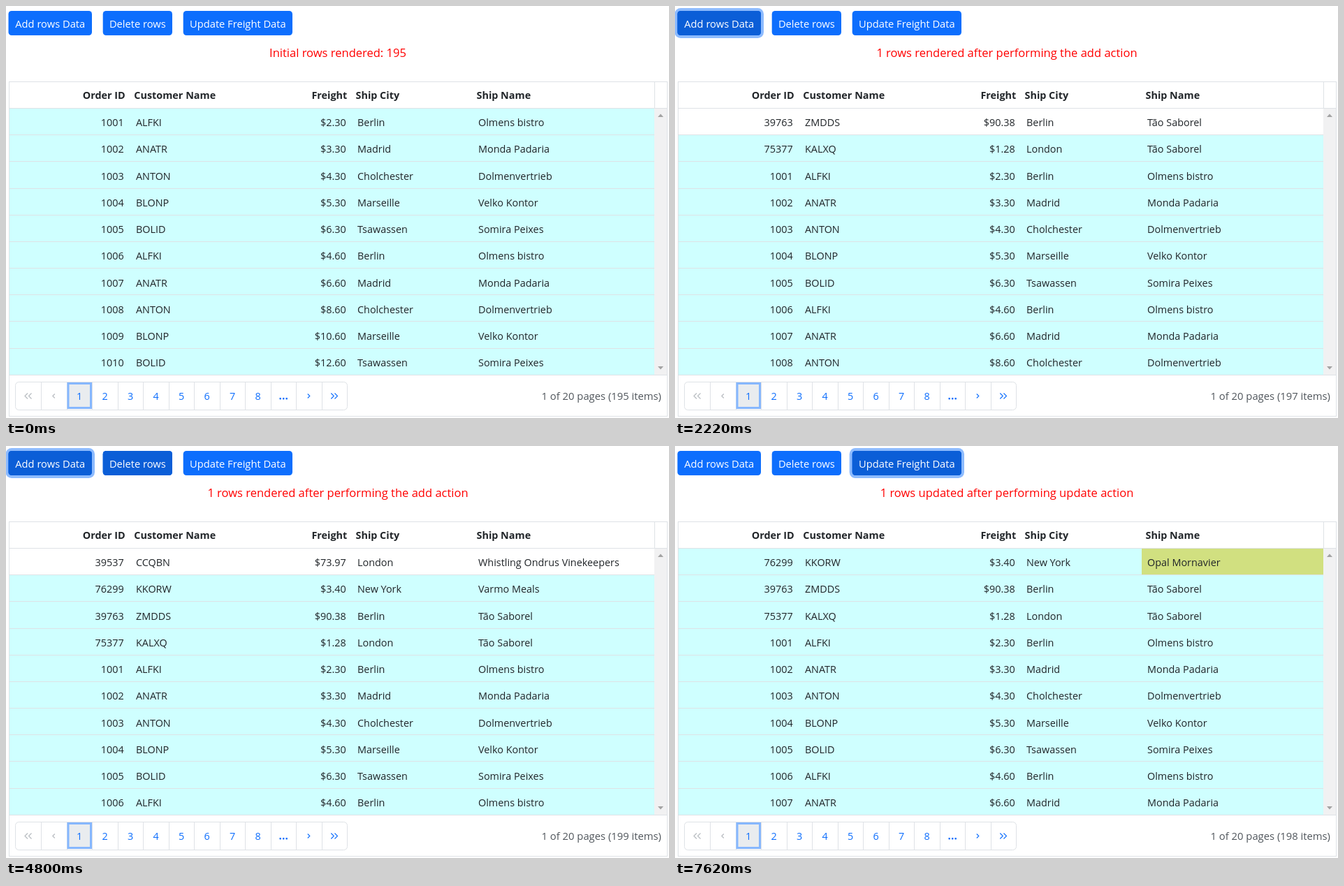
Write an HTML page that moves like this. It is 949 px wide and 590 px high and loops after 9.54 s.

```html
<!DOCTYPE html>
<html lang="en">
<head>
<meta charset="utf-8">
<title>Order grid</title>
<style>
html, body { margin: 0; width: 100%; height: 100%; overflow: hidden; background: #fff; }
svg { display: block; font: 14.4px "Open Sans", "Noto Sans", sans-serif; fill: #212529; }
.line { fill: #dee2e6; shape-rendering: crispEdges; }
.head { font-weight: 700; }
.btn { font-size: 14.7px; fill: #fff; }
.msg { font-size: 16.55px; fill: #f00; }
.info { font-size: 14.8px; fill: #50565c; }
.page { fill: #0d6efd; }
.end { text-anchor: end; }
.mid { text-anchor: middle; }
.icon { fill: none; stroke-width: 1.1; }
</style>
</head>
<body>
<svg width="949" height="590" viewBox="0 0 949 590"><g id="frame"></g><g id="live"></g></svg>
<script>
const LOOP = 9540, TICK = 60;
const ADDED = [1320, 2220, 2640, 3480], DELETED = 4980, UPDATED = 7440;

const NEW_ROWS = [
  [75377, 'KALXQ', 1.28, 'London', 'Tão Saborel'],
  [39763, 'ZMDDS', 90.38, 'Berlin', 'Tão Saborel'],
  [76299, 'KKORW', 3.4, 'New York', 'Varmo Meals'],
  [39537, 'CCQBN', 73.97, 'London', 'Whistling Ondrus Vinekeepers']
];
const CUSTOMERS = [
  ['ALFKI', 'Berlin', 'Olmens bistro'],
  ['ANATR', 'Madrid', 'Monda Padaria'],
  ['ANTON', 'Cholchester', 'Dolmenvertrieb'],
  ['BLONP', 'Marseille', 'Velko Kontor'],
  ['BOLID', 'Tsawassen', 'Somira Peixes']
];
const BASE_ROWS = Array.from({ length: 10 }, (_, i) => {
  const [code, city, ship] = CUSTOMERS[i % 5];
  return [1001 + i, code, (2.3 + i % 5) * (1 + Math.floor(i / 5)), city, ship];
});

const rect = (x, y, w, h, attrs) => `<rect x="${x}" y="${y}" width="${w}" height="${h}" ${attrs}/>`;
const line = (x, y, w, h) => rect(x, y, w, h, 'class="line"');
const text = (x, y, s, cls = '') => `<text x="${x}" y="${y}" class="${cls}">${s}</text>`;
const icon = (d, color) => `<path class="icon" d="${d}" stroke="${color}"/>`;

function chevron(x, y, dir, size, color) {
  return icon(`M${x - dir * size / 2} ${y - size}l${dir * size} ${size}l${-dir * size} ${size}`, color);
}

function drawFrame() {
  const blue = '#0d6efd', grey = '#b4b9be', cell = 36.5, mid = 558.5;
  let s = line(4, 108, 943, 1) + line(4, 587, 943, 1) + line(4, 108, 1, 480) + line(946, 108, 1, 480)
    + line(4, 146, 943, 1) + line(928, 108, 1, 39);
  s += text(170.7, 133, 'Order ID', 'head end') + text(183.3, 133, 'Customer Name', 'head')
    + text(488.3, 133, 'Freight', 'head end') + text(500.5, 133, 'Ship City', 'head')
    + text(673.5, 133, 'Ship Name', 'head');

  // scrollbar
  s += rect(928, 147, 18, 381, 'fill="#f1f1f2"')
    + '<path d="M933 159l4-4.500 4 4.500zM933 516l4 4.500 4-4.500z" fill="#a3a3a3"/>';
  s += line(4, 528, 943, 1);

  // pager
  s += rect(13.5, 538.5, 475, 40, 'rx="5" fill="#fff" stroke="#dee2e6"');
  for (let i = 1; i < 13; i++) s += line(Math.round(13.5 + i * cell), 539, 1, 39);
  s += rect(89, 540.5, 32.5, 35, 'fill="#e9ecef" stroke="#86b7fe" stroke-width="3"');
  for (let i = 1; i < 9; i++) s += text(105 + (i - 1) * cell, 564, i, 'page mid');
  for (const x of [392.7, 397.2, 401.7]) s += rect(x - 1.2, 561, 2.4, 2.4, 'rx=".6" class="page"');
  s += chevron(29, mid, -1, 4, grey) + chevron(34.5, mid, -1, 4, grey) + chevron(68.3, mid, -1, 3, grey)
    + chevron(433.3, mid, 1, 3, blue) + chevron(467.3, mid, 1, 4, blue) + chevron(472.5, mid, 1, 4, blue);
  return s;
}

function button(x, w, label, dark, ring, pressed) {
  const spread = 4 * ring;
  let s = '';
  if (ring > 0) {
    s += rect(x - spread, 7 - spread, w + 2 * spread, 35 + 2 * spread,
      `rx="${4.5 + spread}" fill="#3184fd" fill-opacity="${0.55 * ring}"`);
  }
  s += rect(x, 7, w, 35, 'rx="4.5" fill="#0d6efd"');
  if (dark > 0) s += rect(x, 7, w, 35, `rx="4.5" fill="${pressed ? '#0a58ca' : '#0b5ed7'}" fill-opacity="${dark}"`);
  return s + text(x + w / 2, 30.5, label, 'btn mid');
}

function drawRow([id, code, freight, city, ship], i, fresh, changed) {
  const top = Math.round(147 + 38.17 * i), next = Math.round(147 + 38.17 * (i + 1));
  const y = 172 + Math.round(38.25 * i);
  let s = rect(5, top, 923, next - top - 1, `fill="${fresh ? '#fff' : '#cfffff'}"`);
  if (changed) s += rect(668, top, 260, next - top - 1, 'fill="#d1e080"');
  return s + line(5, next - 1, 923, 1)
    + text(168.7, y, id, 'end') + text(186, y, code)
    + text(486.7, y, '$' + freight.toFixed(2), 'end') + text(503, y, city)
    + text(676, y, changed ? 'Opal Mornavier' : ship);
}

function drawLive(t) {
  const within = (a, b) => t >= a && t < b;
  const step = a => t >= a ? 1 : 0;
  const ramp = (a, b) => Math.min(1, Math.max(0, (t - a) / (b - a)));
  const count = ADDED.filter(a => t >= a).length;
  const gone = step(DELETED), updated = t >= UPDATED;

  const rows = [...NEW_ROWS.slice(0, count).reverse(), ...BASE_ROWS].slice(gone, gone + 10);
  const settling = within(2640, 2700) || within(3480, 3540);
  const fresh = count > 0 && !gone && !settling;

  const message = updated ? '1 rows updated after performing update action'
    : gone ? '1 rows deleted after performing delete action'
    : count ? '1 rows rendered after performing the add action'
    : 'Initial rows rendered: 195';

  const toDelete = ramp(DELETED, 5160), toUpdate = ramp(7380, 7620);
  return button(3.5, 119.5, 'Add rows Data', step(720) - toDelete, ramp(1320, 1560) - toDelete, within(2520, 2640))
    + button(138.7, 99.3, 'Delete rows', step(4800) - toUpdate, toDelete - toUpdate)
    + button(253.7, 156.3, 'Update Freight Data', step(7380), toUpdate)
    + text(475, 73, message, 'msg mid')
    + rows.map((row, i) => drawRow(row, i, fresh && !i, updated && !i)).join('')
    + text(938, 564, `1 of 20 pages (${195 + count - gone} items)`, 'info end');
}

const live = document.getElementById('live');
document.getElementById('frame').innerHTML = drawFrame();
const start = performance.now();
let shown = -1;

function play() {
  const t = Math.floor((performance.now() - start) % LOOP / TICK) * TICK;
  if (t !== shown) live.innerHTML = drawLive(shown = t);
  requestAnimationFrame(play);
}
play();
</script>
</body>
</html>
```
